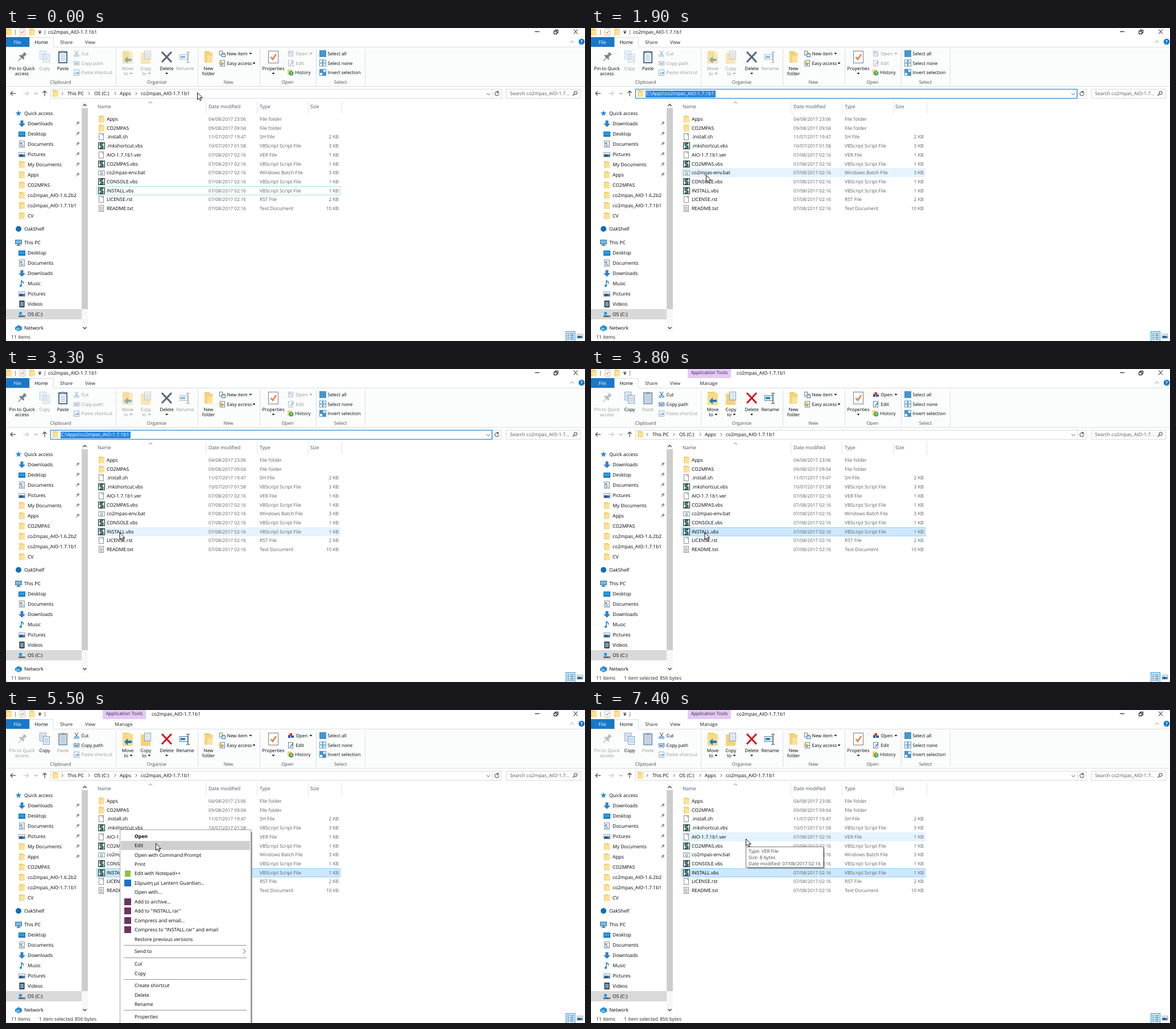
Write an HTML page with a canvas that moves like this. It is 1018 by 550 pixels and loops after 8 s.

```html
<!DOCTYPE html>
<html lang="en">
<head>
<meta charset="utf-8">
<title>File window</title>
<style>
html, body { margin: 0; width: 100%; height: 100%; overflow: hidden; background: #fff; }
canvas { display: block; width: 1018px; height: 550px; }
</style>
</head>
<body>
<canvas id="stage" width="1018" height="550"></canvas>
<script>
const ctx = document.getElementById('stage').getContext('2d');
const LOOP = 8000, ROW = 15.7, TOP = 152;
const INK = '#000', DIM = '#969696', GREY = '#5f5f5f', HEAD = '#40536d';
const BLUE = '#2086d8', LINE = '#dcdddf';

// Drawing helpers
function box(x, y, w, h, c) { ctx.fillStyle = c; ctx.fillRect(x, y, w, h); }
function frame(x, y, w, h, c) {
  ctx.strokeStyle = c; ctx.lineWidth = 1;
  ctx.strokeRect(x + .5, y + .5, w - 1, h - 1);
}
function panel(x, y, w, h, fill, edge) { box(x, y, w, h, fill); frame(x, y, w, h, edge); }
function path(c, lw, ...p) {
  ctx.beginPath();
  for (let i = 0; i < p.length; i += 2) ctx.lineTo(p[i], p[i + 1]);
  if (lw) { ctx.strokeStyle = c; ctx.lineWidth = lw; ctx.stroke(); }
  else { ctx.fillStyle = c; ctx.fill(); }
}
function disc(x, y, r, c, lw) {
  ctx.beginPath(); ctx.arc(x, y, r, 0, 7);
  if (lw) { ctx.strokeStyle = c; ctx.lineWidth = lw; ctx.stroke(); }
  else { ctx.fillStyle = c; ctx.fill(); }
}
function text(s, x, y, c = INK, size = 8.5, align = 'left', weight = '') {
  ctx.font = `${weight} ${size}px "Open Sans", "Noto Sans", sans-serif`;
  ctx.textAlign = align; ctx.fillStyle = c;
  ctx.fillText(s, x, Math.round(y + 3));
}
function at(draw, x, y, alpha = 1, scale = 1) {
  ctx.save();
  ctx.translate(x, y); ctx.scale(scale, scale); ctx.globalAlpha *= alpha;
  draw();
  ctx.restore();
}
const caret = (x, y, c = INK) => path(c, 0, x - 2.5, y - 1.2, x + 2.5, y - 1.2, x, y + 1.6);
const chevron = (x, y, dx, dy, c = '#555', lw = 1) =>
  dx ? path(c, lw, x - dx, y - dy, x + dx, y, x - dx, y + dy)
     : path(c, lw, x - 3, y - dy, x, y + dy, x + 3, y - dy);

// Icons, drawn around their centre
const icon = {
  folder() {
    box(-5, -6, 7, 12, '#efc75e'); box(-5, -5, 10, 11, '#f6d478'); box(-3, -3, 8, 9, '#fbe29a');
  },
  page() { panel(-5, -6, 9, 12, '#fff', '#8d8d8d'); path('#8d8d8d', 1, 1, -6, 1, -3, 4, -3); },
  lines() {
    panel(-5, -6, 9, 12, '#fff', '#8d8d8d');
    for (let y = -3; y < 5; y += 2) box(-3, y, 5, 1, '#8f9aa5');
  },
  script() {
    panel(-6, -6, 12, 12, '#e6efed', '#1c2022');
    path('#14282c', 2.8, 3, -4, -2, -3, -2, -1, 2, 1, 2, 3, -3, 4);
    path('#3fb59b', 1.1, 3, -4, -2, -3, -2, -1, 2, 1, 2, 3, -3, 4);
  },
  batch() {
    panel(-6, -4, 12, 9, '#f4f8fb', '#8ea0b0'); box(-6, -4, 12, 2, '#aebdca'); disc(0, 1.5, 1.8, '#8598a8', 1.2);
  },
  star() {
    ctx.beginPath();
    for (let i = 0; i < 10; i++) {
      const a = i * Math.PI / 5, r = i % 2 ? 2.3 : 5.5;
      ctx.lineTo(r * Math.sin(a), -r * Math.cos(a));
    }
    ctx.fillStyle = BLUE; ctx.fill();
  },
  down() { path('#2f7fd0', 0, -2.5, -5.5, 2.5, -5.5, 2.5, 0, 6, 0, 0, 6, -6, 0, -2.5, 0); },
  desktop() { panel(-6, -4, 12, 9, '#1ba0ea', '#1668a8'); box(-6, 3, 12, 2, '#1668a8'); },
  docs() {
    panel(-5, -6, 10, 12, '#fff', '#7c8c9a');
    box(-3, -3, 3, 3, '#3e86c8'); box(1, -3, 2, 1, '#7c8c9a');
    box(-3, 1, 6, 1, '#7c8c9a'); box(-3, 3, 6, 1, '#7c8c9a');
  },
  picture() {
    panel(-6, -4, 12, 9, '#e8f3fb', '#9aa4ac'); box(-5, 0, 10, 4, '#3f83bd');
    path('#27577f', 0, -5, 3, -1, -1, 3, 4, -5, 4);
  },
  pc() { panel(-6, -5, 12, 8, '#67bff0', '#4f6f88'); box(-2, 3, 4, 2, '#6c8496'); box(-4, 5, 8, 1, '#6c8496'); },
  music() { path(BLUE, 1.6, -1, 3.5, -1, -5, 2, -3, 3, 0); disc(-2.2, 4, 2.1, BLUE); },
  video() {
    box(-5, -6, 10, 12, '#3a3f44'); box(-3, -4, 6, 8, '#6d9cc0');
    for (let y = -5; y < 6; y += 2) { box(-5, y, 1, 1, '#ddd'); box(4, y, 1, 1, '#ddd'); }
  },
  drive() { box(-5, -4, 5, 5, '#1ba0ea'); box(-6, 2, 12, 3, '#5d6a75'); box(3, 3, 2, 1, '#7df07a'); },
  network() { path('#2b8ad0', 0, -6, -1, 0, -5, 6, -2, 6, 3, 0, 6, -6, 3); box(-4, 0, 6, 4, '#67bff0'); },
  cloud() { disc(0, 0, 5, '#0f6fc0'); },
  tack() {
    ctx.rotate(.75);
    box(-2, -4, 4, 4, '#8b949c'); box(-3, 0, 6, 1, '#8b949c'); box(-.5, 1, 1, 4, '#8b949c');
  },
  bigTack() {
    ctx.rotate(.75);
    box(-3, -9, 6, 2, '#66727c'); box(-2.5, -7, 5, 6, '#7d8992'); box(-5, -1, 10, 2.5, '#66727c'); box(-.6, 1.5, 1.2, 8, '#66727c');
  },
  sheets() {
    for (const [x, y] of [[-9, -11], [-3, -5]]) {
      panel(x, y, 12, 15, '#f3f8fd', '#7d9dbb');
      for (let i = 3; i < 13; i += 2) box(x + 2, y + i, 8, 1, '#a9c4dd');
    }
  },
  paste() {
    panel(-8, -10, 16, 21, '#4f7aa5', '#41668b'); box(-6, -7, 12, 16, '#f2f6fa');
    box(-3, -11, 6, 4, '#8797a6');
    for (let y = -4; y < 8; y += 3) box(-4, y, 8, 1, '#9db6cf');
  },
  cut() {
    path('#55677a', 1.2, -3, -5, 2, 2); path('#55677a', 1.2, 3, -5, -2, 2);
    disc(-2.5, 3.5, 1.7, BLUE, 1.1); disc(2.5, 3.5, 1.7, BLUE, 1.1);
  },
  pathTag() { panel(-5, -3, 10, 7, '#dceaf6', '#5d7f9f'); path('#2e5d8c', 1, -3, -1, -1, 2, 0, 0, 1, 2, 3, -1); },
  shortcut() { panel(-5, -5, 10, 11, '#f2f6fa', '#5b7692'); path(BLUE, 1.5, -2, 4, -2, 1, 3, 1); path(BLUE, 0, 1, -2, 5, 1, 1, 4); },
  bigFolder() { box(-7, -10, 9, 20, '#edc35b'); box(-7, -8, 14, 18, '#f6d27a'); box(-2, -2, 9, 12, '#fbe29a'); },
  move() {
    box(-9, -11, 12, 21, '#efca6b'); box(-9, -9, 18, 21, '#f8da87');
    path('#1c79c8', 0, -6, 5, 0, -1, 0, 3, 7, 3, 7, 7, 0, 7, 0, 11);
  },
  copyTo() {
    box(-9, -8, 17, 20, '#f6d27a'); panel(-3, -11, 12, 15, '#f3f8fd', '#7d9dbb');
    for (let y = -8; y < 3; y += 3) box(-1, y, 8, 1, '#a9c4dd');
  },
  rename() {
    panel(-10, -5, 15, 10, '#f2f6fa', '#5e7e9e'); box(-8, -2, 8, 4, BLUE);
    path('#44586c', 1.3, 2, -9, 5, -8, 8, -9); path('#44586c', 1.3, 5, -8, 5, 9); path('#44586c', 1.3, 2, 10, 5, 9, 8, 10);
  },
  newItem() { panel(-5, -5, 6, 8, '#fff', '#5e7e9e'); box(-1, -2, 6, 3, '#e5b740'); panel(-1, 0, 7, 6, '#dff0fb', '#2d78ae'); },
  easy() { panel(-4, -5, 9, 11, '#fff', '#5e7e9e'); box(-5, -2, 6, 5, '#e5b740'); path(BLUE, 1.3, -1, 4, 3, 0); },
  check() { panel(-9, -11, 18, 22, '#fff', '#71808e'); path('#ed7d3b', 2.6, -4.5, 0, -1, 4, 5, -5); },
  openGrey() { panel(-5, -5, 9, 10, '#dce6ef', '#7f97ad'); box(-3, -3, 3, 3, '#7f97ad'); path('#7f97ad', 1, 0, 3, 4, -1); },
  openApp() {
    box(-5, -1, 4, 5, '#3a49c9'); box(-2, -4, 4, 4, '#d42b2b'); box(0, 0, 5, 4, '#2f3f9f'); box(-4, -4, 2, 2, '#e8b92f'); box(1, 2, 3, 2, '#43a852');
  },
  edit() { panel(-5, -5, 9, 11, '#fff', '#5e7e9e'); path('#2f78b8', 1.8, -1, 3, 4, -3); path('#e8a23c', 1.8, -2, 4, -1, 3); },
  history() { box(-5, -5, 8, 9, '#f2ce70'); disc(1.5, 1.5, 4, '#46a35b'); path('#fff', 1, 1.5, -1, 1.5, 2, 3.5, 2); },
  rar() { box(-6, -6, 12, 12, '#6d3560'); },
  note() { box(-5, -5, 10, 11, '#8cc24a'); },
  shield() { box(-6, -6, 12, 12, '#1673c4'); }
};

function grid(x, y, fills) {
  fills.forEach((c, i) => panel(x - 6 + i % 2 * 6, y - 6 + (i >> 1) * 6, 6, 6, c, '#5093c4'));
}

function titleBar(app) {
  at(icon.folder, 5, 7);
  at(icon.check, 29, 7, 1, .5);
  at(icon.folder, 46, 7);
  box(16, 3, 1, 9, '#888'); box(68, 3, 1, 9, '#888');
  box(57, 5, 5, 1, INK); caret(59.5, 8.5);
  if (app) {
    box(170, 0, 76, 16, '#e4c9f5');
    text('Application Tools', 208, 6, '#33243d', 8.2, 'center');
    text('Manage', 207, 25, '#222', 8.4, 'center');
  }
  text('co2mpas_AIO-1.7.1b1', app ? 256 : 74, 7);
  box(930, 6, 8, 1, INK);
  frame(965, 3, 6, 6, INK); panel(963, 5, 6, 6, '#fff', INK);
  path(INK, 1, 998, 2.5, 1005, 10.5); path(INK, 1, 1005, 2.5, 998, 10.5);
  chevron(995, 24, 0, -1.7, '#888');
  disc(1012, 24, 5.2, '#0f74cf'); text('?', 1012, 24, '#fff', 8, 'center', 'bold');
  box(0, 16, 41, 17, '#1878c9');
  text('File', 20, 25, '#fff', 8.3, 'center');
  text('Share', 106, 25, '#222', 8.3, 'center');
  text('View', 148, 25, '#222', 8.3, 'center');
}

function ribbon(sel, app) {
  box(0, 33, 1018, 69, '#fbfcfc');
  box(0, 33, 1018, 1, LINE); box(0, 102, 1018, 1, LINE);
  box(41, 16, 43, 18, '#fbfcfc');
  path(LINE, 1, 41.5, 34, 41.5, 16.5, 83.5, 16.5, 83.5, 34);
  text('Home', 62, 25, INK, 8.3, 'center');

  const big = (draw, x, a, b, on, scale) => {
    const c = on ? INK : DIM;
    at(draw, x, 51, on ? 1 : .5, scale);
    text(a, x, 71, c, 8.1, 'center');
    if (b) text(b, b === 'to' ? x - 3 : x, 80, c, 8.1, 'center');
    if (b === 'to') caret(x + 6, 80, c);
  };
  const small = (draw, x, y, s, on) => {
    at(draw, x, y, on ? 1 : .5);
    text(s, x + 8.5, y, on ? INK : DIM, 8.15);
  };
  big(icon.bigTack, 28, 'Pin to Quick', 'access', !app);
  big(icon.sheets, 68, 'Copy', '', sel);
  big(icon.paste, 100, 'Paste', '', !app);
  small(icon.cut, 124, 45, 'Cut', sel);
  small(icon.pathTag, 124, 61.5, 'Copy path', sel);
  small(icon.shortcut, 124, 78, 'Paste shortcut', false);
  big(icon.move, 214, 'Move', 'to', sel);
  big(icon.copyTo, 246, 'Copy', 'to', sel);
  const cross = sel ? '#d1191f' : '#55687c';
  path(cross, 3.2, 274, 42, 291, 60); path(cross, 3.2, 291, 42, 274, 60);
  text('Delete', 282.5, 71, INK, 8.1, 'center'); caret(282.5, 80);
  big(icon.rename, 315, 'Rename', '', sel);
  big(icon.bigFolder, 356, 'New', 'folder', true);
  small(icon.newItem, 380, 45, 'New item', true); caret(430, 45);
  small(icon.easy, 380, 61.5, 'Easy access', true); caret(436, 62);
  big(icon.check, 470, 'Properties', '', true); caret(470, 80);
  small(app ? icon.openApp : icon.openGrey, 501, 45, 'Open', app); caret(536, 45, app ? INK : DIM);
  small(icon.edit, 501, 61.5, 'Edit', app);
  small(icon.history, 500, 78, 'History', true);
  grid(557, 45, ['#3c96d8', '#3c96d8', '#3c96d8', '#3c96d8']);
  grid(557, 61.5, ['#fff', '#fff', '#fff', '#fff']);
  grid(557, 78, ['#3c96d8', '#fff', '#fff', '#3c96d8']);
  text('Select all', 565.5, 45, INK, 8.15);
  text('Select none', 565.5, 61.5, INK, 8.15);
  text('Invert selection', 565.5, 78, INK, 8.15);
  [['Clipboard', 96, 193], ['Organise', 265, 337], ['New', 391, 446], ['Open', 495, 545], ['Select', 588, 631]]
    .forEach(([s, x, edge]) => { text(s, x, 95, '#4c4c4c', 8.2, 'center'); box(edge, 37, 1, 63, LINE); });
}

function addressBar(editing) {
  const arrow = (x, dir, c) => {
    path(c, 1.2, x - 4.5, 115, x + 4.5, 115);
    path(c, 1.2, x + dir, 111.5, x + dir * 4.5, 115, x + dir, 118.5);
  };
  arrow(12.5, -1, '#444'); arrow(35, 1, '#c4c4c4');
  chevron(52.5, 115, 0, 1.2, '#777');
  path('#444', 1.2, 68, 119.5, 68, 111); path('#444', 1.2, 64.5, 114, 68, 110.5, 71.5, 114);
  frame(78, 107, 793, 17, '#d9d9d9');
  box(855, 107, 1, 17, '#d9d9d9');
  at(icon.folder, 87, 115);
  if (editing) {
    frame(78, 107, 777, 17, '#0078d7');
    box(96, 110, 123, 12, '#2b86dc');
    text('C:\\Apps\\co2mpas_AIO-1.7.1b1', 96.5, 115, '#fff');
  } else {
    [['This PC', 98, 108], ['OS (C:)', 145, 155], ['Apps', 191, 200], ['co2mpas_AIO-1.7.1b1', 228, 237]]
      .forEach(([s, a, x]) => { chevron(a + 1, 115, 1.2, 2.5); text(s, x, 115); });
  }
  chevron(848, 116, 0, 1.7);
  ctx.beginPath(); ctx.arc(863, 115.5, 3.4, -.3, 5); ctx.strokeStyle = '#555'; ctx.lineWidth = 1.1; ctx.stroke();
  path('#555', 0, 863, 110, 867, 112, 864, 115);
  frame(879, 107, 132, 17, '#d9d9d9');
  text('Search co2mpas_AIO-1.7...', 886, 115, '#555');
  disc(1001.5, 114, 2.7, '#555', 1.1); path('#555', 1.5, 999.5, 116, 996.5, 119);
}

const places = [
  ['Downloads', 'down'], ['Desktop', 'desktop'], ['Documents', 'docs'], ['Pictures', 'picture'],
  ['My Documents', 'folder'], ['Apps', 'folder'], ['CO2MPAS', 'folder'],
  ['co2mpas_AIO-1.6.2b2', 'folder'], ['co2mpas_AIO-1.7.1b1', 'folder'], ['CV', 'folder']
];
const drives = [
  ['Desktop', 'desktop'], ['Documents', 'docs'], ['Downloads', 'down'], ['Music', 'music'],
  ['Pictures', 'picture'], ['Videos', 'video'], ['OS (C:)', 'drive']
];

function sidebar() {
  box(0, 494, 133, 18, '#d9d9d9');
  const root = (s, name, y) => { at(icon[name], 22, Math.round(y)); text(s, 32, y); };
  const list = (items, y0) => items.forEach(([s, name], i) => {
    at(icon[name], 28, Math.round(y0 + 18 * i));
    text(s, 38, y0 + 18 * i);
  });
  root('Quick access', 'star', 149.5);
  list(places, 167.5);
  for (let i = 0; i < 6; i++) at(icon.tack, 126, 167.5 + 18 * i, 1, .85);
  root('OakShelf', 'cloud', 353);
  root('This PC', 'pc', 377);
  list(drives, 395);
  root('Network', 'network', 526.5);
  box(133, 129, 11, 404, '#f7f7f7'); box(133, 141, 11, 353, '#cdcdcd');
  chevron(138.5, 135.5, 0, -1.6, '#444', 1.4); chevron(138.5, 527, 0, 1.6, '#444', 1.4);
}

const VBS = 'VBScript Script File', DAY = '07/08/2017 02:16';
const files = [
  ['Apps', '04/08/2017 23:06', 'File folder', '', 'folder'],
  ['CO2MPAS', '09/08/2017 09:04', 'File folder', '', 'folder'],
  ['.install.sh', '11/07/2017 19:47', 'SH File', '2 KB', 'page'],
  ['.mkshortcut.vbs', '10/07/2017 01:58', VBS, '3 KB', 'script'],
  ['AIO-1.7.1b1.ver', DAY, 'VER File', '1 KB', 'page'],
  ['CO2MPAS.vbs', DAY, VBS, '1 KB', 'script'],
  ['co2mpas-env.bat', DAY, 'Windows Batch File', '3 KB', 'batch'],
  ['CONSOLE.vbs', DAY, VBS, '1 KB', 'script'],
  ['INSTALL.vbs', DAY, VBS, '1 KB', 'script'],
  ['LICENSE.rst', DAY, 'RST File', '2 KB', 'page'],
  ['README.txt', DAY, 'Text Document', '10 KB', 'lines']
];
const PICKED = 8;

function fileList(hover, hoverAlpha, selected, focused) {
  [['Name', 161], ['Date modified', 356], ['Type', 446], ['Size', 535]]
    .forEach(([s, x]) => text(s, x, 138, HEAD));
  for (const x of [351, 441, 531, 590]) box(x, 128, 1, 22, '#e3e3e3');
  chevron(254, 131, 0, -1.4, '#777');
  files.forEach(([name, date, type, size, kind], i) => {
    const y = 160 + ROW * i, top = Math.round(y - 8);
    if (i === PICKED && selected) panel(159, top, 429, 16, '#cce8ff', '#99d1ff');
    else if (i === hover) {
      ctx.globalAlpha = hoverAlpha;
      box(159, top, 429, 16, '#e5f3ff');
      ctx.globalAlpha = 1;
    } else if (i === PICKED && focused) frame(159, top, 429, 16, '#a6dcf5');
    at(icon[kind], 168, Math.round(y));
    text(name, 177, y);
    text(date, 356, y, GREY, 8.15);
    text(type, 446, y, GREY, 8.45);
    text(size, 585, y, GREY, 8.4, 'right');
  });
}

function statusBar(selected) {
  text('11 items', 9, 542.5, '#222');
  if (selected) { text('1 item selected', 58, 542.5, '#222'); text('856 bytes', 121, 542.5, '#222'); }
  panel(984, 533, 17, 18, '#cce8ff', '#26a0da');
  for (let y = 537; y < 548; y += 3) { box(987, y, 3, 1, '#45606f'); box(992, y, 6, 1, '#45606f'); }
  at(icon.picture, 1009, 541, 1, .9);
}

const menu = [
  ['Open', 221.5], ['Edit', 238], ['Open with Command Prompt', 254.5], ['Print', 271],
  ['Edit with Notepad++', 287, 'note'], ['Σάρωση με Lantern Guardian...', 303.5, 'shield'],
  ['Open with...', 320], ['Add to archive...', 336.5, 'rar'], ['Add to "INSTALL.rar"', 353, 'rar'],
  ['Compress and email...', 369.5, 'rar'], ['Compress to "INSTALL.rar" and email', 386, 'rar'],
  ['Restore previous versions', 402.5], ['Send to', 424], ['Cut', 446], ['Copy', 462.5],
  ['Create shortcut', 484], ['Delete', 500.5], ['Rename', 517], ['Properties', 538.5]
];

function contextMenu(alpha, pointerY) {
  ctx.globalAlpha = alpha;
  box(431, 214, 2, 336, '#9b9b9b');
  panel(200, 210, 231, 342, '#fff', '#a5a5a5');
  menu.forEach(([s, y, name], i) => {
    if (alpha === 1 && Math.abs(pointerY - y) < 8.2) box(202, Math.round(y - 8), 227, 16, '#cfcfcf');
    if (name) at(icon[name], 214, Math.round(y));
    text(s, 226, y, INK, 8.55, 'left', i ? '' : 'bold');
  });
  for (const y of [413, 435, 473, 527]) box(207, y, 216, 1, '#919191');
  chevron(419, 424, 2.2, 4.5);
  ctx.globalAlpha = 1;
}

function tooltip(alpha) {
  ctx.globalAlpha = alpha;
  box(275, 243, 136, 36, 'rgba(0,0,0,.3)');
  panel(272, 240, 137, 37, '#fff', '#767676');
  text('Type: VER File', 277, 247.5, '#484848', 8.3);
  text('Size: 8 bytes', 277, 259, '#484848', 8.3);
  text('Date modified: 07/08/2017 02:16', 277, 270, '#484848', 8.3);
  ctx.globalAlpha = 1;
}

// Pointer stops: time, x, y
const stops = [
  [0, 336, 113], [1400, 336, 113], [1900, 202, 258], [2000, 208, 259], [2100, 208, 259],
  [2300, 202, 259.5], [2400, 202, 259.5], [2700, 201, 276], [3100, 201, 276], [3300, 199.5, 287],
  [5000, 199.5, 287], [5300, 262, 247], [5400, 262, 247], [5500, 263, 234], [5800, 272, 226], [LOOP, 272, 226]
];

function pointerAt(t) {
  const i = stops.findIndex(s => s[0] > t);
  const [t0, x0, y0] = stops[i - 1], [t1, x1, y1] = stops[i];
  const u = (t - t0) / (t1 - t0), e = u * u * (3 - 2 * u);
  return [x0 + (x1 - x0) * e, y0 + (y1 - y0) * e];
}

function arrowPointer() {
  const p = [0, 0, 0, 12.3, 2.8, 9.7, 4.8, 14.2, 6.9, 13.3, 5, 9, 8.8, 9, 0, 0];
  path('#fff', 0, ...p); path('#111', 1, ...p);
}

function busyRing() {
  disc(0, 0, 7.2, '#4aa6e0', 3); disc(0, 0, 7.2, '#a9dcf7', 1);
}

function draw(ms) {
  const t = Math.floor(ms / 100) * 100;
  const [x, y] = pointerAt(t);
  const selected = t >= 3600, app = t >= 3800;
  const menuOpen = t >= 4800 && t < 6100;
  const overRow = t >= 1500 && !menuOpen ? Math.floor((y - TOP) / ROW) : -1;
  const rowAlpha = t >= 6100 ? Math.min(1, (t - 6000) / 400) : 1;

  box(0, 0, 1018, 550, '#fff');
  titleBar(app);
  ribbon(selected, app);
  addressBar(t >= 1000 && !selected);
  sidebar();
  fileList(overRow, rowAlpha, selected, t < 1000);
  statusBar(selected);
  if (menuOpen) contextMenu(t < 4900 ? .62 : 1, t >= 5100 ? y : 0);
  if (t >= 7200) tooltip(Math.min(1, (t - 7100) / 300));
  if (t >= 4400 && t < 4600) at(busyRing, x + .5, y + 2);
  else at(arrowPointer, x + .5, y + .5);
}

ctx.textRendering = 'geometricPrecision';
const start = performance.now();
function tick() {
  draw((performance.now() - start) % LOOP);
  requestAnimationFrame(tick);
}
tick();
</script>
</body>
</html>
```
